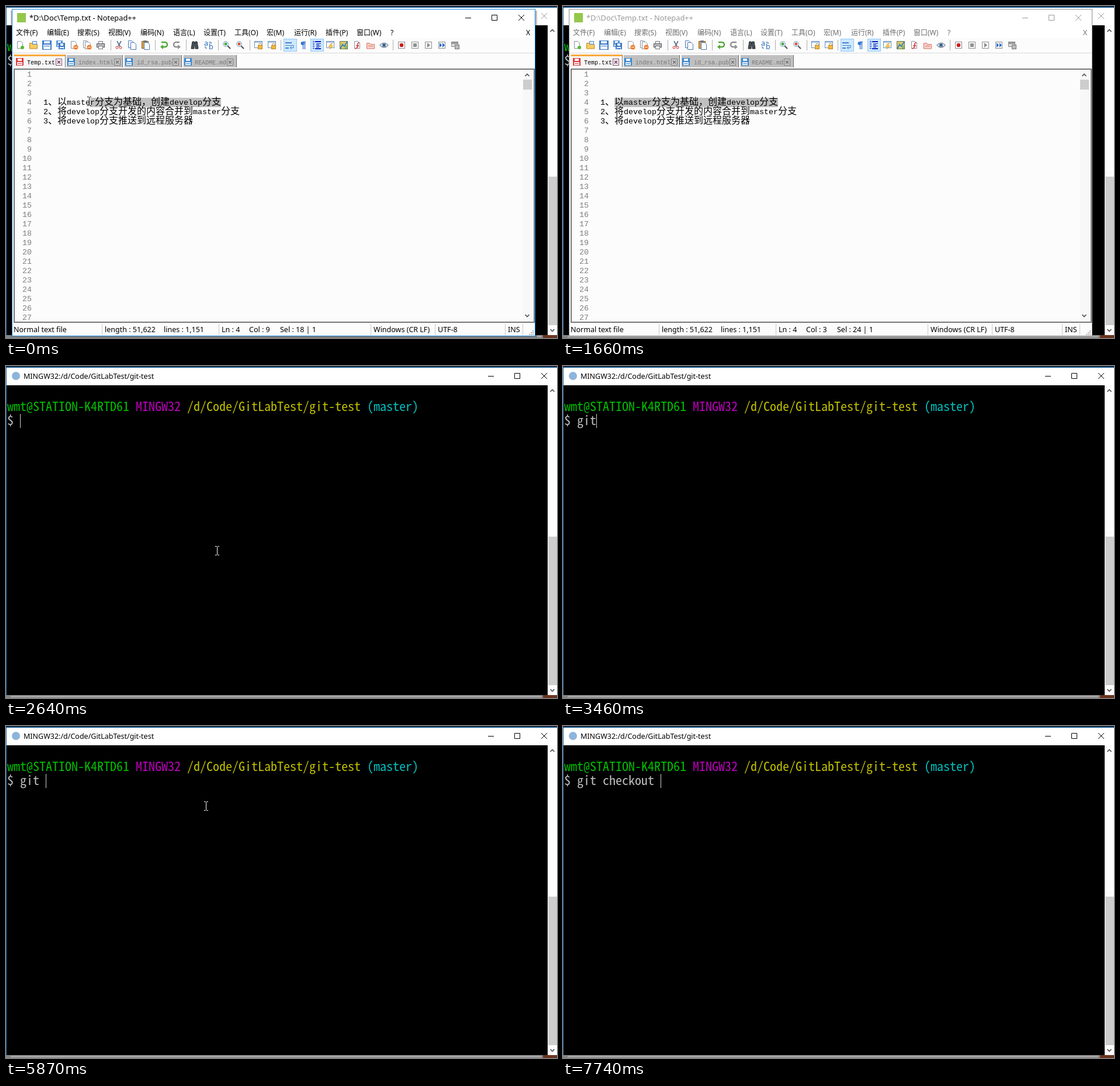
An HTML page for the animation above (8000 ms loop, 943 by 568 pixels).

```html
<!DOCTYPE html>
<html lang="zh">
<head>
<meta charset="utf-8">
<title>Git session</title>
<style>
html, body { margin: 0; width: 943px; height: 568px; overflow: hidden; background: #000; }
svg { display: block; }
rect { shape-rendering: crispEdges; }
text { white-space: pre; }
.ui { font: 12.5px "Noto Sans", "Noto Sans CJK SC", "Noto Sans CJK JP", sans-serif; }
.menu { font-size: 12px; }
.title { font-size: 12.8px; }
.code { font: 13.333px "Liberation Mono", monospace; }
.han { font: 300 16px "Noto Sans CJK SC", "Noto Sans CJK JP", sans-serif; }
.tab { font: 10px "Liberation Mono", monospace; }
.term { font-family: "Noto Sans Mono CJK SC", "Noto Sans Mono CJK JP", "Noto Sans Mono", monospace; }
</style>
</head>
<body>
<svg id="stage" width="943" height="568" viewBox="0 0 943 568"></svg>
<script>
const LOOP = 8000, ADV = 11;
const TERM = '"Noto Sans Mono CJK SC","Noto Sans Mono CJK JP","Noto Sans Mono",monospace';

const rect = (x, y, w, h, fill, more = '') =>
  `<rect x="${x}" y="${y}" width="${w}" height="${h}" fill="${fill}" ${more}/>`;
const box = (x, y, w, h, fill, stroke) => rect(x, y, w, h, stroke) + rect(x + 1, y + 1, w - 2, h - 2, fill);
const path = (d, stroke, width = 1, fill = 'none') =>
  `<path d="${d}" stroke="${stroke}" stroke-width="${width}" fill="${fill}"/>`;
const dot = (x, y, r, fill, stroke = 'none') =>
  `<circle cx="${x}" cy="${y}" r="${r}" fill="${fill}" stroke="${stroke}"/>`;
const esc = s => s.replace(/&/g, '&amp;').replace(/</g, '&lt;');
const text = (x, y, s, cls, fill = '#000', more = '') =>
  `<text x="${x}" y="${y}" class="${cls}" fill="${fill}" ${more}>${esc(s)}</text>`;
const move = (x, y, s) => `<g transform="translate(${x} ${y})">${s}</g>`;

// Minimise, maximise and close, 45px apart
const buttons = (x, y, c) =>
  path(`M${x - 5} ${y + .5}h10M${x + 40.5} ${y - 4.5}h9v9h-9zM${x + 86} ${y - 5}l10 10m0-10l-10 10`, c);
const chevron = (x, y, up) =>
  path(`M${x - 3.5} ${y + up * 2}l3.5 ${-up * 3.5}l3.5 ${up * 3.5}`, '#505050', 1.7);

// Terminal text size giving an 11px advance
const pen = document.createElement('canvas').getContext('2d');
pen.font = '100px ' + TERM;
const termSize = ADV * 100 / pen.measureText('M').width;
const term = (col, row, s, fill, id = '') =>
  text(2 + ADV * col, 77 + 24 * row, s, 'term', fill, `font-size="${termSize}" ${id && `id="${id}"`}`);

function terminal() {
  return rect(0, 0, 943, 3, '#202a3c') + rect(0, 563, 943, 5, '#858585') +
    rect(8, 564, 908, 3, '#a5a5a5') + rect(919, 563, 24, 5, '#6d3420') +
    rect(0, 2, 943, 561, '#1878c0') + rect(1, 3, 942, 30, '#fff') + rect(1, 33, 926, 530, '#000') +
    dot(17, 17, 7, '#8db4dc') +
    text(30, 22, 'MINGW32:/d/Code/GitLabTest/git-test', 'ui') +
    `<g id="termButtons">${buttons(830, 17, 'currentColor')}</g>` +
    rect(927, 33, 16, 530, '#fcfcfc') + rect(928, 292, 15, 254, '#cdcdcd') +
    chevron(935, 42, 1) + chevron(935, 555, -1) +
    term(0, 0, 'wmt@STATION-K4RTD61', '#00c000') + term(20, 0, 'MINGW32', '#c000c0') +
    term(28, 0, '/d/Code/GitLabTest/git-test', '#c0c000') + term(56, 0, '(master)', '#00c0c0') +
    '<rect id="mark" y="58" height="24" fill="#00c0c0"/>' + term(57, 0, '', '#000', 'markText') +
    term(0, 1, '$', '#bfbfbf') + term(2, 1, '', '#bfbfbf', 'typed') +
    '<rect id="caret" y="82" width="1" height="24" fill="#d0d0d0"/>';
}

// Toolbar icons, each in a 16px cell
const page = (x = 3, y = 1, s = '#8a93a0') => path(`M${x}.5 ${y}.5h6l3 3v9h-9z`, s, 1, '#fff');
const minus = dot(11.5, 11.5, 4, '#f08030') + rect(9, 11, 5, 1, '#fff');
const floppy = (c, s, x = 0, y = 0) =>
  rect(x, y, s, s, c) + rect(x + 3, y + 1, s - 6, 4, '#f0f4fa') + rect(x + 2, y + 7, s - 4, s - 8, '#f0f4fa') +
  rect(x + 3, y + 9, s - 6, 1, c);
const folder = (c, s) => path('M1.5 14V4.500h5l1 2h7V14z', s, 1, c);
const lens = c => path('M9 9l5 5', '#555', 2.2) + dot(6, 6, 4.5, '#dceefa', '#8aa4bc') + dot(6, 6, 2.4, c);
const win = box(1, 1, 14, 12, '#fff', '#7090b8') + rect(2, 2, 12, 2, '#a8c8ec');
const lock = box(7, 8, 8, 7, '#f4b83c', '#b88830') + path('M9 8V6q2-2 4 0v2', '#b88830');
const lines = (x, w, ys, c) => ys.map(y => rect(x, y, w, 1, c)).join('');
const key = s => box(2, 2, 12, 12, '#f8f8f8', '#909090') + s;
const mark = (d, c) => path(d, 'none', 0, c);
const bend = c => path('M4 3h6a4 4 0 0 1 0 8H6', c, 2.5) + mark('M7 7v8L2 11z', c);
const flip = s => `<g transform="matrix(-1 0 0 1 16 0)">${s}</g>`;

const icons = [
  [24, page() + dot(12, 12, 3, '#58b838')],
  [47, folder('#f8cc60', '#c08828') + box(6, 1, 8, 6, '#dcecfc', '#5a88c0')],
  [70, floppy('#3c7cc8', 16)],
  [93, floppy('#5c94d4', 11, 1, 0) + floppy('#3c7cc8', 11, 5, 4)],
  [116, page() + minus], [139, page(1, 0) + page(4, 2) + minus],
  [162, box(4, 1, 8, 5, '#fff', '#777') + box(1, 5, 14, 7, '#b8bcc4', '#555') + box(4, 9, 8, 6, '#fff', '#777')],
  [193, path('M5 1l5 9M12 1L7 10', '#56708c', 1.6) + dot(5, 12, 2, 'none', '#d03030') + dot(11, 12, 2, 'none', '#d03030')],
  [216, page(1, 0, '#4a78b8') + page(5, 3, '#4a78b8')],
  [239, box(1, 1, 12, 13, '#d8a050', '#8c6024') + rect(4, 0, 6, 3, '#777') + page(5, 3, '#4a78b8')],
  [270, bend('#50a838')], [293, flip(bend('#909090'))],
  [323, path('M4 2h3l1 4 1-4h3l2 12H9V9H7v5H2z', '#222', 1, '#48505c')],
  [347, text(0, 9, 'a', 'ui', '#2868b8') + text(8, 15, 'b', 'ui', '#2868b8', 'font-weight="700"') + path('M8 3h4v3M5 13H2v-3', '#2868b8')],
  [378, lens('#48a838')], [401, lens('#e05030')],
  [432, win + lock], [455, win + lock],
  [486, lines(0, 11, [3, 4], '#4880c8') + lines(0, 14, [8], '#4880c8') + lines(0, 6, [12, 13], '#4880c8') + path('M14 8v4.500H8M11 10l-3 2.500 3 2.500', '#4880c8')],
  [509, path('M7.500 15V2M10.500 15V2M12 2.500H7', '#3878d0', 1.4) + dot(6.5, 5, 3, '#3878d0')],
  [532, lines(1, 3, [1, 4, 7, 10, 13], '#1020c0') + lines(5, 10, [1, 2, 13, 14], '#1020c0') + lines(7, 8, [5, 9], '#1020c0') + lines(7, 5, [7, 11], '#1020c0')],
  [555, win + path('M9 5l-4 6h4l-2 4 6-6H9l3-4z', '#c89020', .6, '#f8d048')],
  [578, box(1, 1, 14, 14, '#d8c870', '#6c7c50') + path('M2 14l4-7 3 3 5-8', '#3c84b8', 2) + rect(10, 9, 4, 5, '#88b868')],
  [601, page() + path('M4 14q6-1 5-7q0-4 3-3M6 9h5', '#d83030', 1.6)],
  [624, folder('#f8d0c8', '#d07868') + rect(4, 9, 8, 1, '#d07868')],
  [647, path('M1 8q7-8 14 0q-7 8-14 0z', '#888', 1.2, '#f4f4f4') + dot(8, 8, 3.4, '#5a90c8') + dot(8, 8, 1.4, '#203040')],
  [677, key(dot(8, 8, 3.2, '#d01818'))],
  [700, key(rect(5, 5, 6, 6, '#909090'))], [723, key(mark('M6 4v8l5-4z', '#888'))],
  [746, key(mark('M4 4v8l4-4zM9 4v8l4-4z', '#2868c8'))],
  [769, box(1, 2, 12, 9, '#ddd', '#888') + rect(2, 3, 10, 3, '#999') + box(7, 7, 8, 8, '#bbb', '#777')]
];

// Mixed lines: wide glyphs are 16px, the others 8px
function mixed(y, s) {
  let x = 64;
  return s.match(/[ -~]+|[^ -~]+/g).map(run => {
    const wide = run.charCodeAt(0) > 255, out = text(x, y, run, wide ? 'han' : 'code');
    x += run.length * (wide ? 16 : 8);
    return out;
  }).join('');
}

function tab(x, w, name, nameX, on) {
  const closeX = nameX + name.length * 6 + 1;
  return rect(x, on ? 83 : 84, w, on ? 24 : 21, on ? '#f8f8f8' : '#c0c0c0') + (on ? rect(x, 83, w, 3, '#faaa3c') : '') +
    rect(x + w - 1, 84, 1, 21, '#707070') + rect(x, 84, 1, 21, on ? '#ddd' : '#e8e8e8') +
    move(x + (on ? 4 : 2), 89, floppy(on ? '#e03c3c' : '#3c88d0', 13)) +
    text(nameX, 100, name, 'tab', on ? '#000' : '#777') +
    box(closeX, 90, 11, 12, on ? '#f8f4f8' : '#c8c8c8', on ? '#805070' : '#808080') +
    path(`M${closeX + 3} 93.500l5 5m0-5l-5 5`, on ? '#704060' : '#707070', 1.6);
}

function notepad() {
  const menu = [[17, '文件(F)'], [70, '编辑(E)'], [122, '搜索(S)'], [175, '视图(V)'], [230, '编码(N)'], [286, '语言(L)'],
    [338, '设置(T)'], [391, '工具(O)'], [446, '宏(M)'], [493, '运行(R)'], [547, '插件(P)'], [600, '窗口(W)'], [658, '?'], [890, 'X']];
  const status = [[13, 'Normal text file'], [169, 'length : 51,622'], [270, 'lines : 1,151'], [369, 'Ln : 4'],
    [629, 'Windows (CR LF)'], [739, 'UTF-8'], [859, 'INS']];
  let s = '<rect id="shade" x="8" y="8" width="901" height="559" fill="#000" opacity=".25"/>' +
    '<rect id="frame" x="10" y="5" width="896" height="560"/>' + rect(11, 6, 894, 558, '#fff') +
    rect(19, 12, 15, 16, '#94c84c') +
    '<g id="head">' + text(40, 25, '*D:\\Doc\\Temp.txt - Notepad++', 'ui title', 'currentColor') + buttons(791, 20, 'currentColor') + '</g>' +
    '<g id="menu">' + menu.map(([x, m]) => text(x, 50, m, 'ui menu', 'currentColor')).join('') + '</g>' +
    rect(11, 55, 894, 52, '#fcfcfc') + rect(11, 80, 894, 1, '#d8d8d8');
  for (const x of [475, 521]) s += box(x, 56, 23, 22, '#cce8ff', '#90c8f6');
  for (const x of [179, 255, 308, 363, 417, 470, 662]) s += rect(x, 58, 1, 18, '#b0b0b0');
  s += icons.map(([x, art]) => move(x - 8, 59, art)).join('');
  s += tab(103, 97, 'index.html', 124) + tab(202, 99, 'id_rsa.pub', 224) + tab(303, 92, 'README.md', 323) +
    tab(13, 89, 'Temp.txt', 36, true);
  s += rect(13, 107, 892, 435, '#787878') + rect(15, 109, 888, 431, '#fcfcfc') +
    rect(885, 109, 16, 431, '#f8f8f8') + rect(885, 126, 15, 17, '#cdcdcd') + chevron(892, 118, 1) + chevron(892, 530, -1);
  for (let n = 1; n <= 27; n++)
    s += text(44, 105 + 16 * n, String(n), 'code', '#808080', 'text-anchor="end"');
  s += '<rect id="pick" y="157" height="16" fill="#c0c0c0"/>' +
    mixed(169, '1、以master分支为基础，创建develop分支') +
    mixed(185, '2、将develop分支开发的内容合并到master分支') +
    mixed(201, '3、将develop分支推送到远程服务器') +
    '<rect id="editCaret" x="87" y="157" width="1" height="16"/>';
  s += rect(11, 542, 894, 22, '#fcfcfc');
  for (const x of [164, 364, 624, 734, 854, 884]) s += rect(x, 544, 1, 19, '#c8c8c8');
  s += status.map(([x, m]) => text(x, 558, m, 'ui')).join('') +
    text(416, 558, '', 'ui', '#000', 'id="col"') + text(469, 558, '', 'ui', '#000', 'id="sel"');
  for (let row = 0; row < 3; row++)
    for (let i = 0; i <= row; i++) s += rect(901 - 3 * i, 555 + 3 * row, 2, 2, '#b0b0b0');
  return s;
}

document.getElementById('stage').innerHTML = terminal() + `<g id="editor">${notepad()}</g>` +
  '<path id="beam" d="M-3-7.500h2.500l1 1 1-1H4M-3 7.500h2.500l1-1 1 1H4M.5-6.500v13" fill="none"/>' +
  '<path id="arrow" d="M.5.5v16l4-4 2.500 6 2-1-2.500-5.500h5z" fill="#fff" stroke="#000"/>';

const el = {};
document.querySelectorAll('[id]').forEach(e => el[e.id] = e);
const show = (e, on) => e.setAttribute('visibility', on ? 'visible' : 'hidden');
const at = (list, t) => list.reduce((a, k) => k[0] <= t ? k : a, [0, 0]);

const mouse = [[0, 142, 163], [140, 130, 163], [260, 118, 163], [380, 106, 163], [500, 94, 163], [800, 98, 177],
  [960, 260, 540], [1110], [2220, 352, 346], [2360, 357, 330], [2490, 361, 316], [3070],
  [4300, 854, 284], [4420, 850, 165], [4540, 842, 72], [4690, 750, 71], [4820, 679, 70],
  [4960, 694, 69], [5090, 677, 69], [5210, 655, 69], [5330, 634, 68], [5470, 520, 90], [5590, 400, 122], [5710, 342, 137], [6400]];
const pick = [[0, 144], [140, 128], [260, 120], [380, 104], [500, 88]];
const marked = [[0, 6], [5090, 4], [5210, 2], [5330, 0], [5870, 6]];
const blink = [[1940, 1], [2360, 0], [2640, 1], [4420, 0], [4960, 1], [5470, 0], [5710, 1]];
const keys = [3070, 3340, 3460, 3890, 6400, 6550, 6680, 6950, 7070, 7320, 7470, 7620, 7740];

function draw(t) {
  const editing = t < 1940, active = t < 1660;
  el.editor.style.display = editing ? '' : 'none';
  el.head.style.color = active ? '#000' : '#999';
  el.menu.style.color = active ? '#000' : '#6d6d6d';
  el.termButtons.style.color = editing ? '#999' : '#000';
  el.frame.setAttribute('fill', active ? '#1883d7' : '#8a8a8a');
  show(el.shade, active);

  const x = at(pick, t)[1], col = x < 104 ? 3 : 4 + (x - 104) / 8;
  el.pick.setAttribute('x', x);
  el.pick.setAttribute('width', 368 - x);
  el.col.textContent = 'Col : ' + col;
  el.sel.textContent = `Sel : ${27 - col} | 1`;
  el.editCaret.style.display = t >= 960 && t < 1510 ? '' : 'none';

  const n = keys.filter(k => k <= t).length;
  el.typed.textContent = 'git checkout '.slice(0, n);
  el.caret.setAttribute('x', 24 + ADV * n);
  show(el.caret, at(blink, t)[1]);

  const from = at(marked, t)[1], left = 629 + ADV * from;
  el.mark.setAttribute('x', left);
  el.mark.setAttribute('width', 695 - left);
  el.markText.setAttribute('x', left);
  el.markText.textContent = 'master'.slice(from);

  const [, mx, my] = at(mouse, t), inBar = editing && my > 500;
  show(el.beam, mx && !inBar);
  show(el.arrow, inBar);
  if (mx) (inBar ? el.arrow : el.beam).setAttribute('transform', `translate(${mx} ${my})`);
  el.beam.setAttribute('stroke', editing ? '#000' : '#fff');
}

const start = performance.now();
function tick() {
  draw((performance.now() - start) % LOOP);
  requestAnimationFrame(tick);
}
tick();
</script>
</body>
</html>
```
